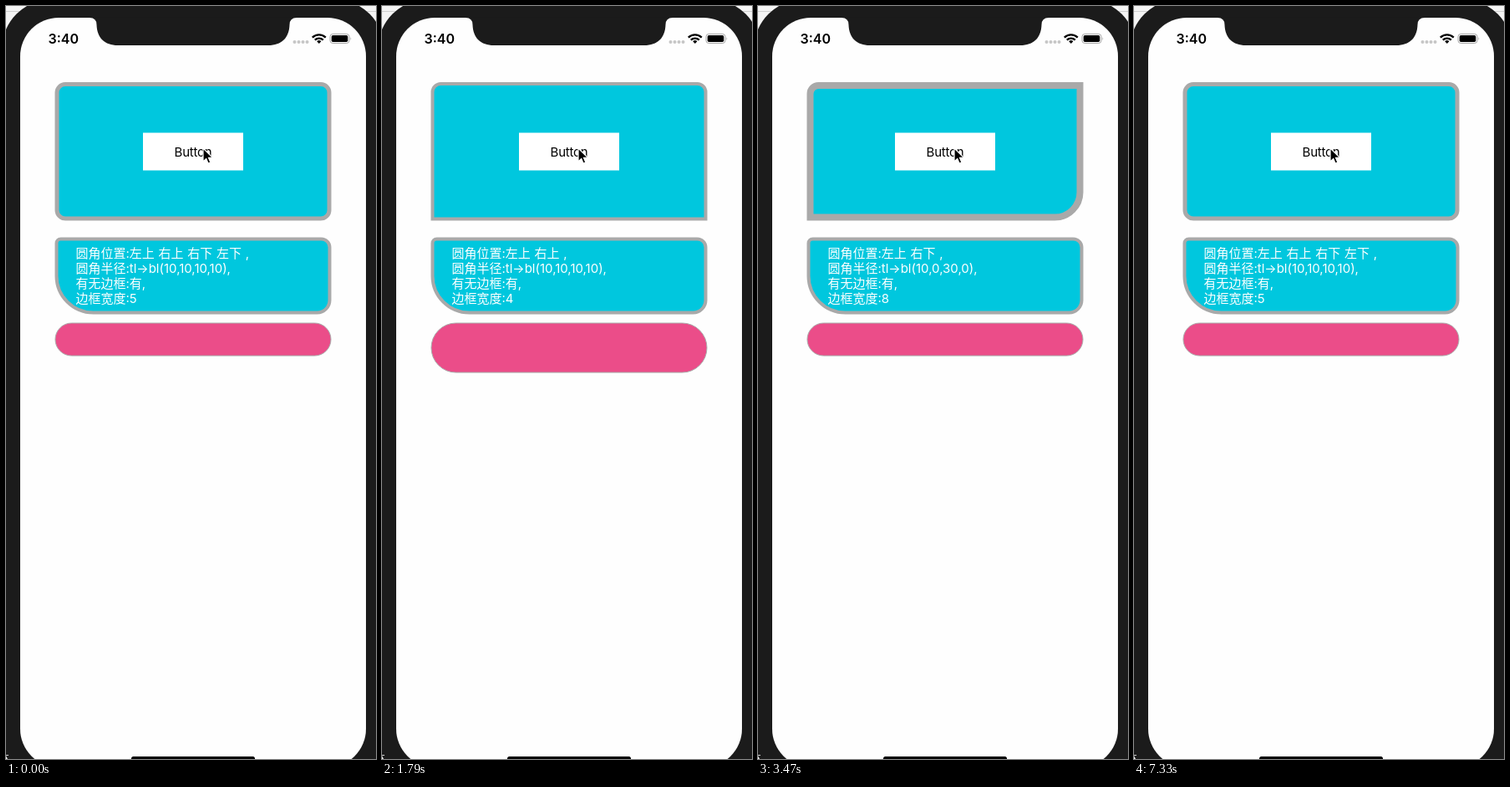
Write an HTML page that moves like this. It is 443 by 900 pixels and loops after 8000 ms.

```html
<!DOCTYPE html>
<html lang="zh-CN">
<head>
<meta charset="utf-8">
<title>Rounded corners</title>
<style>
  html, body { margin: 0; width: 100%; height: 100%; overflow: hidden; }
  svg { display: block; }
  text { font: 15px Inter, "Noto Sans CJK SC", "Noto Sans CJK", sans-serif; }
  #lines { fill: #fff; word-spacing: .5px; }
</style>
</head>
<body>
<svg width="443" height="900" viewBox="0 0 443 900">
  <rect width="443" height="900" fill="#f4f4f4"/>
  <path d="M0 6.5H443" stroke="#cfcfcf"/>
  <rect x="-5" y="-8" width="458" height="940" rx="60" fill="#1b1b1b"/>
  <path d="M0 895.5h3" stroke="#ccc"/>
  <rect x="17" y="14" width="414" height="896" rx="46" fill="#fefefe"/>
  <path d="M100 13.5v.5q8.500 0 8.500 8.500C109 38 118 47 134 47H314c16 0 25-9 25.500-24.500q0-8.500 8.500-8.500v-.5z" fill="#1b1b1b"/>
  <rect x="150" y="897" width="148" height="5" rx="2.5"/>

  <text x="50.500" y="44.500" style="font-size:16px;font-weight:600">3:40</text>
  <path d="M345.500 43h.01m5 0h.01m5 0h.01m5 0h.01" stroke="#c6c6c6" stroke-width="4" stroke-linecap="round"/>
  <g fill="none" stroke="#000" stroke-width="2.300">
    <path d="M366.800 37.600a11.500 11.500 0 0 1 16 0M369.800 40.700a7.200 7.200 0 0 1 10 0"/>
    <path d="M372.200 42.300a3.700 3.700 0 0 1 5.200 0l-2.600 2.700z" fill="#000" stroke="none"/>
  </g>
  <rect x="388" y="33.500" width="23" height="11" rx="3.200" fill="none" stroke="#a6a6a6"/>
  <rect x="389.700" y="35" width="19.600" height="8" rx="1.800"/>
  <path d="M412.500 37.200q1.600 1.800 0 3.800z" fill="#a6a6a6"/>

  <g stroke="#a9a9a9" fill="#00c7de">
    <path id="box"/>
    <path id="panel" stroke-width="4"/>
    <rect id="pill" x="59" width="330" fill="#eb4d89" stroke-width="1"/>
  </g>
  <rect x="164" y="151.500" width="120" height="45" fill="#fff"/>
  <text x="224" y="179.500" text-anchor="middle" letter-spacing="-.24">Button</text>
  <g id="lines"></g>
  <path id="cursor" d="M0 0V16l3.700-3.500 2.400 5.600 2.800-1.200-2.400-5.500H11.500z" stroke="#fff" stroke-width="1.200"/>
</svg>
<script>
const $ = id => document.getElementById(id);
const LEFT = 58.5, WIDTH = 331, LOOP = 8000, STEP = 85;
const FAST = [.5, .87, 1], SLOW = [.08, .55, .9, 1];

// start, corner names, radii in words, drawn radii, border, pill height, previous border, easing steps
const state = (start, corners, label, radii, border, pill, from = border, steps = [1]) =>
  ({ start, radii, border, pill, from, steps, lines: corners
    ? [`圆角位置:${corners} ,`, `圆角半径:tl->bl(${label}),`, '有无边框:有,', `边框宽度:${border}`]
    : ['移除所有圆角'] });

const ALL = '左上 右上 右下 左下', TENS = '10,10,10,10', ROUND = [10, 10, 10, 10];
const states = [
  state(0, ALL, TENS, ROUND, 5, 40),
  state(830, '左上 右上 右下', TENS, [10, 10, 10, 0], 2, 10, 5, FAST),
  state(1620, '左上 右上', TENS, [10, 10, 0, 0], 4, 60, 2, FAST),
  state(2400, '左上 左下', '10,0,0,10', [10, 0, 0, 10], 4, 10),
  state(3210, '左上 右下', '10,0,30,0', [10, 0, 30, 0], 8, 40, 4, SLOW),
  state(4630, '', '', [0, 0, 0, 0], 0, 10),
  state(5980, ALL, TENS, ROUND, 0, 40),
  state(7330, ALL, TENS, ROUND, 5, 40)
];

function roundRect(y, height, inset, [tl, tr, br, bl]) {
  const w = WIDTH - 2 * inset, h = height - 2 * inset;
  const arc = (r, dx, dy) => `a${r} ${r} 0 0 1 ${dx * r} ${dy * r}`;
  return `M${LEFT + inset + tl} ${y + inset}h${w - tl - tr}${arc(tr, 1, 1)}v${h - tr - br}${arc(br, -1, 1)}` +
    `h${br + bl - w}${arc(bl, -1, -1)}v${bl + tl - h}${arc(tl, 1, -1)}z`;
}

let shown;
function showState(s) {
  const single = s.lines.length === 1;
  const height = single ? 48 : 92, top = 276.5;
  $('box').setAttribute('d', roundRect(91, 165.5, s.border / 2, s.radii));
  $('panel').setAttribute('d', roundRect(top, height, 2, [5, 10, 15, height / 2 - 2]));
  $('pill').setAttribute('y', top + height + 10.5);
  $('pill').setAttribute('height', s.pill - 1);
  $('pill').setAttribute('rx', (s.pill - 1) / 2);
  $('lines').innerHTML = s.lines.map((line, i) =>
    `<text x="83.500" y="${(single ? 306 : 301) + i * 17.9}">${line.replace('>', '&gt;')}</text>`).join('');
  shown = s;
}

function draw(now) {
  const t = now % LOOP;
  const s = states.findLast(s => s.start <= t);
  if (s !== shown) showState(s);
  const step = Math.min(s.steps.length - 1, Math.floor((t - s.start) / STEP));
  $('box').setAttribute('stroke-width', s.from + (s.border - s.from) * s.steps[step]);
  $('cursor').setAttribute('transform', `translate(${t < 630 ? 236 : 235} 170)`);
  requestAnimationFrame(draw);
}
draw(performance.now());
</script>
</body>
</html>
```
